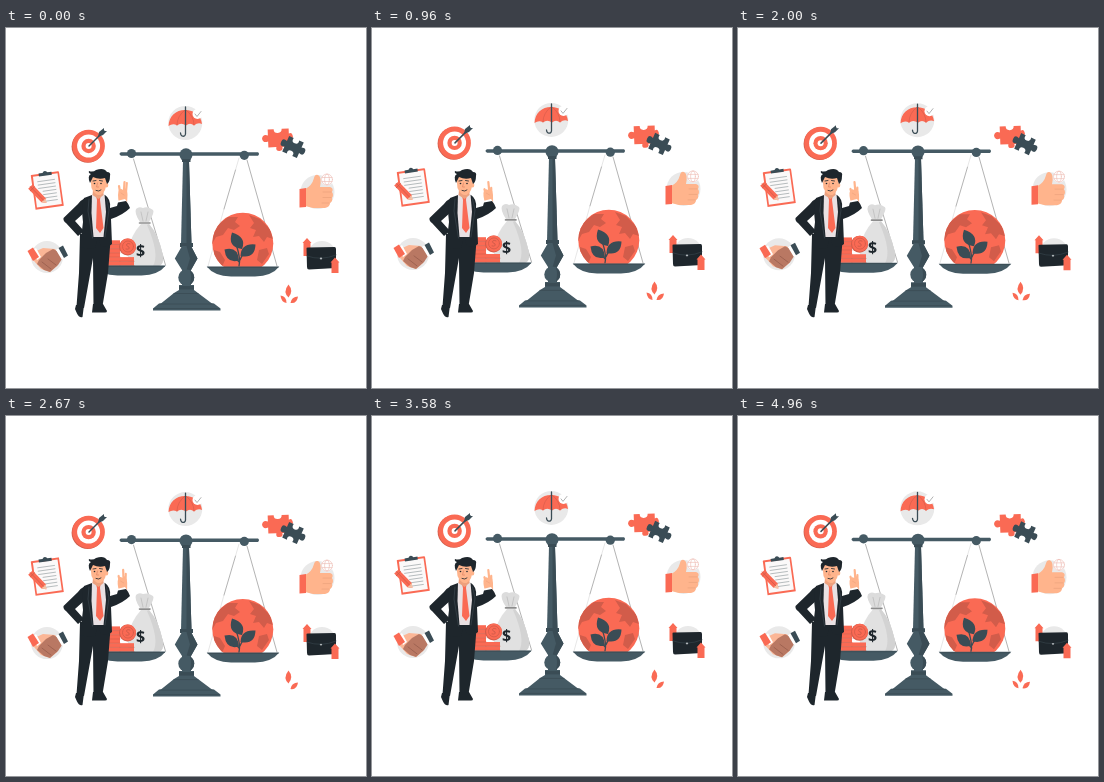
Write an HTML page with a canvas that moves like this. It is 360 px wide and 360 px high and loops after 5000 ms.

```html
<!DOCTYPE html>
<html lang="en">
<head>
<meta charset="utf-8">
<title>Balance</title>
<style>
html, body { margin: 0; width: 100%; height: 100%; overflow: hidden; background: #fff; }
canvas { display: block; width: 360px; height: 360px; }
</style>
</head>
<body>
<canvas id="stage"></canvas>
<script>
const LOOP = 5000, BOB = 1500, RISE = 4.3, STEP = 1000 / 24;
const RED = '#fa6a54', DEEP = '#d25c4a', SLATE = '#455a64', DARK = '#3a4c55',
      SUIT = '#1e262c', GRAY = '#e9e9e9', SKIN = '#ffb48c', WHITE = '#fff';

const canvas = document.getElementById('stage');
const ctx = canvas.getContext('2d');
const dpr = window.devicePixelRatio || 1;
canvas.width = canvas.height = 360 * dpr;

function fill(color, d) {
  ctx.fillStyle = color;
  ctx.fill(new Path2D(d));
}
function stroke(color, width, d) {
  ctx.strokeStyle = color;
  ctx.lineWidth = width;
  ctx.stroke(new Path2D(d));
}
function disc(color, x, y, rx, ry = rx, turn = 0) {
  ctx.fillStyle = color;
  ctx.beginPath();
  ctx.ellipse(x, y, rx, ry, turn, 0, Math.PI * 2);
  ctx.fill();
}
function ring(color, width, x, y, rx, ry = rx) {
  ctx.strokeStyle = color;
  ctx.lineWidth = width;
  ctx.beginPath();
  ctx.ellipse(x, y, rx, ry, 0, 0, Math.PI * 2);
  ctx.stroke();
}
function at(x, y, turn, draw) {
  ctx.save();
  ctx.translate(x, y);
  ctx.rotate(turn);
  draw();
  ctx.restore();
}

function umbrella() {
  disc(GRAY, 179.3, 95, 17);
  fill(RED, 'M162.500 98C163 88 170 82 179 82C188 82 195 87 196 96Q192 94 188 97.500Q184 94 180 97.500Q175 94 171 97.500Q167 95 162.500 98Z');
  stroke(DEEP, .6, 'M179 82Q171 88 171 97M180 82Q188 88 188 97');
  stroke(DARK, 1.3, 'M179.500 79V106Q179 109 176 108Q174.500 107 174.500 105');
  disc(WHITE, 191.5, 86, 5);
  stroke('#a9a9a9', .9, 'M189 86L191 88.500L195 83.500');
}

function target() {
  disc(DEEP, 81.8, 118.6, 16.2);
  [[RED, 16.3], [WHITE, 11.5], [RED, 7.2], [WHITE, 3]]
    .forEach(([color, r]) => disc(color, 82.6, 118, r));
  stroke(DARK, 1.5, 'M83 118L98 103');
  fill(DARK, 'M92 109L93 104L98 100L98 103L101 103L97 107Z');
}

function puzzle() {
  at(272, 110, -.04, () => {
    fill(RED, 'M-10 -9H-4Q-4 -5 0 -5Q4 -5 4 -9H11V-4Q14 -6 15 -1Q14 3 11 2V9H4Q5 13 1 13Q-3 13 -2 9H-10V3Q-15 5 -16 0Q-15 -5 -10 -3Z');
  });
  at(287, 119, .42, () => {
    fill(DARK, 'M-8 -8.500H-3Q-4 -4 0 -4Q4 -4 3 -8.500H8V-3Q13 -5 13 0Q13 5 8 3V8.500H3Q4 4 0 4Q-4 4 -3 8.500H-8V3Q-13 5 -13 0Q-13 -5 -8 -3Z');
  });
}

function thumb() {
  disc(GRAY, 311.5, 164, 17);
  fill(SKIN, 'M299 161Q306 158 308 150Q309 146 312 147Q316 149 314 159H324Q328 160 326 164Q328 167 326 170Q327 173 324 175Q324 179 319 180H307L299 178Z');
  stroke('#eba37c', .7, 'M317 164H325M317 169.500H325M316 175H323');
  fill(RED, 'M293.500 161L300 160V179L293.500 179.500Z');
  disc(WHITE, 321, 151.5, 6);
  ring('#ecb9b0', .6, 321, 151.5, 5.5);
  ring('#ecb9b0', .6, 321, 151.5, 2.4, 5.5);
  stroke('#ecb9b0', .6, 'M316 149.500H326M316 153.500H326');
}

function arrowUp(x, y, h) {
  fill(RED, `M${x} ${y}l4.5 5h-1v${h}h-7v-${h}h-1z`);
}
function briefcase() {
  disc(GRAY, 316, 227, 14);
  arrowUp(301, 210, 13);
  fill(SUIT, 'M300.500 220.500Q300 219.500 302 219.500L328.500 219Q330 219 330 221V240L303 241.500Q301 241.500 301 239Z');
  stroke('#36424a', .7, 'M301 228Q315 233 330 227');
  disc('#b0b6b9', 315, 230.5, 1.2, .9);
  arrowUp(329, 229.5, 10.5);
}

function leaves(full) {
  fill(RED, 'M282.500 256.500Q288 263 282.500 269.500Q276.500 264 282.500 256.500Z');
  if (full) fill(RED, 'M274.500 267.500Q280.500 268 280.500 275Q275 274 274.500 267.500Z');
  fill(RED, 'M292 268.500Q291 276 284.500 275Q285.500 268.500 292 268.500Z');
}

function clipboard() {
  at(41, 162.5, -.14, () => {
    fill(RED, 'M-13.500 -17.500H13.500Q14.500 -17.500 14.500 -16V17.500H-14V-17Z');
    fill('#fbf9f9', 'M-12 -15.500H12.800V15.500H-12.300Z');
    for (let i = 0; i < 7; i++) stroke('#a9b0b3', .8, `M${i > 2 ? -4 : -8} ${-10 + i * 3.4}H9`);
    fill(DARK, 'M-6 -15V-18H-2Q0 -21.500 3 -18H7V-15Z');
  });
  at(32, 166.5, .8, () => {
    fill(RED, 'M-11 -3H8L12 0L8 3H-11Z');
    fill('#f5c3a6', 'M8 -3L12 0L8 3Z');
    stroke(DEEP, .8, 'M-11 0H8M-8 -3V3');
  });
}

function handshake() {
  disc(GRAY, 41, 229, 16);
  fill('#fbb696', 'M28 224L37 220L49 221L55 230L51 238L44 244L35 241L28 233Z');
  fill('#b97863', 'M55 225L47 221L40 225L33 232L31 236L38 242L44 244L52 237L56 231Z');
  stroke('#93594a', .7, 'M42 231L50 237M36 234L45 241');
  fill(WHITE, 'M27 222L30 220L35 229L31 232ZM50 222L54 219L59 229L56 232Z');
  fill(RED, 'M21.500 223L27 219.500L33 229L27 233Z');
  fill(DARK, 'M52.500 220L57 217.500L62 227.500L58 230Z');
}

function cords() {
  stroke('#808080', .6, 'M127.500 131L159.500 237M241 132L271 238M229.500 142L218 181');
  stroke('#cfcfcf', .5, 'M233 130L229.500 142M218 181L202 238');
}

function pan(x, y) {
  fill(SLATE, `M${x - 36.3} ${y - .5}H${x + 36.3}Q${x + 29} ${y + 9} ${x + 12} ${y + 9.5}H${x - 12}Q${x - 29} ${y + 9} ${x - 36.3} ${y - .5}Z`);
  stroke(DARK, .8, `M${x - 35} ${y + .4}H${x + 35}`);
}

function stack(x, y, w, count) {
  for (let i = 0; i < count; i++) {
    const top = y - i * 4.2;
    fill(RED, `M${x} ${top - 4.2}h${w}v4.2h-${w}z`);
    stroke(DEEP, .7, `M${x} ${top}h${w}`);
  }
}
function coins() {
  stack(102, 237.5, 12, 6);
  disc(DEEP, 121.5, 219, 8.5);
  disc(RED, 122, 218.5, 8);
  ring(DEEP, .8, 122, 218.5, 5.5);
  stroke(DEEP, 1, 'M124 216Q121 214.500 120.500 217Q121 218.500 123 219Q124 222 120 221');
  stack(114, 237.5, 14, 2);
}

function bag() {
  fill('#e1e1e1', 'M135 196Q125 207 122 222Q121 235 125 238H153Q158 236 157 228Q153 207 143 196Z');
  fill('#d3d3d3', 'M143 196Q153 207 157 228Q158 236 153 238H147Q154 226 141 197Z');
  fill('#dcdcdc', 'M134 194Q128 185 130 181Q133 178 137 180Q142 178 147 182Q149 184 143 194Z');
  stroke('#b9b9b9', .7, 'M137 193L135 184M140 193L142 184');
  stroke('#8d8d8d', 1.6, 'M133.500 195H144');
  ctx.fillStyle = SUIT;
  ctx.font = 'bold 16px "Open Sans", Arial, sans-serif';
  ctx.textAlign = 'center';
  ctx.fillText('$', 134.5, 228);
}

function globe() {
  disc(RED, 236.8, 215.3, 30.5);
  ctx.save();
  ctx.beginPath();
  ctx.arc(236.8, 215.3, 30.5, 0, Math.PI * 2);
  ctx.clip();
  fill(DEEP, 'M213 196L222 189L232 189L229 194L234 198L228 202L222 200L217 207L210 209L206 216V202Z'
    + 'M243 187L254 191L264 201L267 211L261 209L258 214L253 208L247 209L250 202L244 200L248 195Z'
    + 'M208 222L214 224L219 232L216 239L207 231ZM253 222L261 220L263 226L256 236L251 232Z');
  ctx.restore();
  stroke(DARK, 1.3, 'M233 238Q235 231 230 216M234 232Q236 226 243 221M233 234Q230 229 224 229');
  fill(DARK, 'M226 204.500Q241 209 236 221Q221 219 226 204.500Z'
    + 'M249.500 216.500Q249 231 234.500 228Q235 215 249.500 216.500Z'
    + 'M218.500 221.500Q232 218 233 232.500Q220 236 218.500 221.500Z');
}

function stand() {
  fill(SLATE, 'M115 124.300H252Q254 126 252 127.800H115Q112 126 115 124.300Z');
  disc(SLATE, 125.5, 125.5, 4.6);
  disc(SLATE, 238.3, 127.3, 4.6);
  fill(SLATE, 'M177 133H183L185.500 216H175Z');
  fill(DARK, 'M180.500 133H183L185.500 216H180.500Z');
  disc(SLATE, 180, 126.8, 6.5);
  fill(DARK, 'M176 131H184.500V134H176ZM174 215H187V219H174Z');
  fill(SLATE, 'M176 238H185V260H176ZM176 218H185L191.500 230.500L185 242H176L168.800 230.500Z');
  fill(DARK, 'M180.500 218H185L191.500 230.500L185 242H180.500L184 230.500Z');
  disc(SLATE, 180.3, 249.5, 8);
  fill(DARK, 'M184 242.500A8 8 0 0 1 184 256.500Q186 249 184 242.500Z');
  fill(SLATE, 'M173 257H188V262L192 265L208 277H153L168 265L173 262Z');
  fill(DARK, 'M173 258H188V261.500H173Z');
  fill(SLATE, 'M153 275.500H208L214.500 280.500V282.500H147V280.500Z');
  stroke(DARK, .8, 'M168 265.500H192M154 276H207M148 280.500H213');
}

function hand(lift) {
  const open = 1 - lift;
  at(117, 174, -.1 * lift, () => {
    fill(SKIN, 'M-4 1Q-6 -8 -4 -12Q-2 -14 0 -12L2 -14Q4.500 -12 4.500 -7L4 2Z');
    stroke(SKIN, 2.2, `M1 -12L${.5 + open} -20`);
    stroke(SKIN, 2.2, `M-3 -10L${-3.5 - open * .5} ${-12 - open * 4}M3 -10L${3 + open * .8} ${-12 - open * 7}`);
    stroke('#eda17c', .6, 'M-2 -9L1 -7');
  });
}

function man(lift) {
  // shoes
  fill(SUIT, 'M70 277H78L76.500 289Q73 290 71 285.500L69 281ZM87 276H97L101 283Q101 284.500 99 284.500H86Z');
  // trousers
  fill(SUIT, 'M74 206L73 245L70.500 278.500L78 280L87 230L87.500 278H96.500L102 245L105 206Z');
  // bent arm
  fill(SUIT, 'M79 170Q75 172 72 176L57.500 190Q57 193 60 195L72 208L78 203L69 193L79 184Z');
  hand(lift);
  fill(WHITE, 'M111 173L119 171L121 174L112 176Z');
  // jacket
  fill(SUIT, 'M86 167L78 170Q75 180 77 194L74 219Q82 222 89 220L92 208L95 219Q103 219 106 216L105 191Q117 187 124 180Q122 175 120 173L112 174.500L111 178L104 180Q105 171 99 167Z');
  fill('#e9e1e3', 'M86 166H98.500L100 184L97.500 209H87.500L85.500 185Z');
  stroke('#46525a', .5, 'M83 171L82 183L86.500 210M100.500 171L103 182L99 209');
  fill(RED, 'M90 168H94.500L94 172L97.500 200L94 205L90 200L91 172Z');
  // head
  fill('#eda17e', 'M87 162H97.500V167L92.500 171L86.500 167Z');
  fill(SKIN, 'M84.500 151Q85 146 91 145Q100 145 100.500 153Q100.500 164 94.500 167Q89 168 85.500 160Z');
  disc(SKIN, 100.5, 157, 1.8, 2.6);
  fill(SUIT, 'M84 155Q81 148 85 146Q82 145 83 143Q87 144.500 90 142Q98 139 101 144Q105 144 104 148Q104 154 101 156L99 150Q93 152 87 149Z');
  stroke(SUIT, .8, 'M87 153L90 152.500M93.500 152.500L96.500 153M90 162.500Q93 164 95 162');
  disc(SUIT, 88.5, 155.5, .8);
  disc(SUIT, 95, 155.5, .8);
  stroke('#e28868', .8, 'M91.500 155L90.500 159H92.500');
}

function draw(ms) {
  const phase = (ms % BOB) / BOB;
  const lift = 1 - Math.abs(phase * 2 - 1);
  const full = ms < 2210 || ms >= 4910;
  ctx.setTransform(dpr, 0, 0, dpr, 0, 0);
  ctx.fillStyle = WHITE;
  ctx.fillRect(0, 0, 360, 360);
  ctx.lineCap = 'round';
  ctx.lineJoin = 'round';
  at(0, -RISE * lift, 0, () => {
    [umbrella, target, puzzle, thumb, briefcase, clipboard, handshake].forEach(icon => icon());
    leaves(full);
    cords();
    bag();
    coins();
    globe();
    pan(123.5, 238);
    pan(237, 239);
    stand();
  });
  man(lift);
}

const start = performance.now();
function tick() {
  const ms = (performance.now() - start) % LOOP;
  draw(Math.floor(ms / STEP) * STEP);
  requestAnimationFrame(tick);
}
tick();
</script>
</body>
</html>
```
